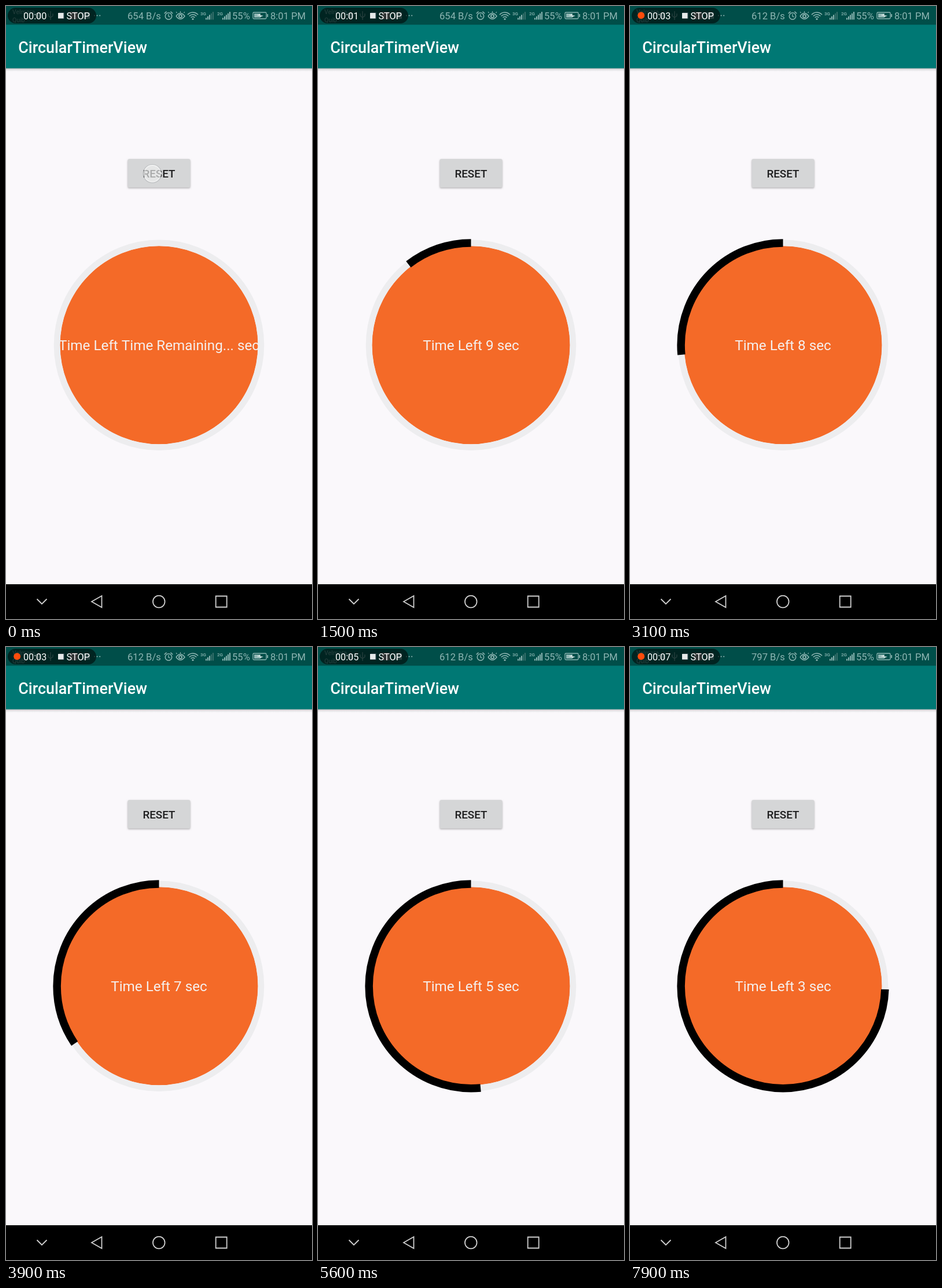
Write an HTML page with a canvas that moves like this. It is 529 by 1058 pixels and loops after 8 s.

```html
<!DOCTYPE html>
<html lang="en">
<head>
<meta charset="utf-8">
<title>CircularTimerView</title>
<style>
html, body { margin: 0; width: 100%; height: 100%; overflow: hidden; background: #faf8fb; }
canvas { display: block; width: 529px; height: 1058px; }
</style>
</head>
<body>
<canvas id="stage"></canvas>
<script>
const W = 529, H = 1058, LOOP = 8000, STEP = 100;
const TAP_END = 450, COUNT = 10000;
const CX = 264.5, CY = 585.3, RING = 176.4;
const ICON = '#8fb6b3';

const canvas = document.getElementById('stage');
const c = canvas.getContext('2d');
const dpr = window.devicePixelRatio || 1;
canvas.width = W * dpr;
canvas.height = H * dpr;
c.scale(dpr, dpr);

function rect(x, y, w, h, color) {
  c.fillStyle = color;
  c.fillRect(x, y, w, h);
}

function round(x, y, w, h, r, color) {
  c.fillStyle = color;
  c.beginPath();
  c.roundRect(x, y, w, h, r);
  c.fill();
}

function disc(x, y, r, color) {
  c.fillStyle = color;
  c.beginPath();
  c.arc(x, y, r, 0, Math.PI * 2);
  c.fill();
}

function arc(x, y, r, from, to, width, color, ccw = false) {
  c.strokeStyle = color;
  c.lineWidth = width;
  c.beginPath();
  c.arc(x, y, r, from, to, ccw);
  c.stroke();
}

const ring = (x, y, r, width, color) => arc(x, y, r, 0, Math.PI * 2, width, color);

function line(points, width, color, closed = false) {
  c.strokeStyle = color;
  c.lineWidth = width;
  c.beginPath();
  points.forEach(([x, y]) => c.lineTo(x, y));
  if (closed) c.closePath();
  c.stroke();
}

function text(str, x, y, size, color, weight = 400, align = 'left') {
  c.font = `${weight} ${size}px Roboto, sans-serif`;
  c.textAlign = align;
  c.fillStyle = color;
  c.fillText(str, x, y);
}

function signal(x, label, lit) {
  text(label, x, 15.5, 8, ICON, 500);
  for (let i = 0; i < 5; i++) {
    const h = 3 + i * 2.6;
    rect(x + 9 + i * 3, 23.5 - h, 2, h, i < lit ? ICON : '#39706c');
  }
}

function alarm(x, y) {
  ring(x, y + 0.5, 5.7, 1.5, ICON);
  line([[x, y - 3], [x, y + 1], [x + 3, y + 2]], 1.3, ICON);
  line([[x - 7.3, y - 4], [x - 3.5, y - 7.3]], 1.6, ICON);
  line([[x + 7.3, y - 4], [x + 3.5, y - 7.3]], 1.6, ICON);
}

function eye(x, y) {
  c.strokeStyle = ICON;
  c.lineWidth = 1.5;
  c.beginPath();
  c.moveTo(x - 7.5, y + 1);
  c.quadraticCurveTo(x, y - 9, x + 7.5, y + 1);
  c.quadraticCurveTo(x, y + 11, x - 7.5, y + 1);
  c.stroke();
  ring(x, y + 1, 2.6, 1.8, ICON);
  line([[x - 6, y - 4.5], [x - 7.3, y - 6.3]], 1.2, ICON);
  line([[x, y - 5], [x, y - 7.5]], 1.2, ICON);
  line([[x + 6, y - 4.5], [x + 7.3, y - 6.3]], 1.2, ICON);
}

function wifi(x, y) {
  for (const r of [4.5, 8.3, 12]) arc(x, y, r, -Math.PI * 0.77, -Math.PI * 0.23, 1.6, ICON);
  disc(x, y - 0.5, 1.6, ICON);
}

function battery(x, y) {
  c.strokeStyle = ICON;
  c.lineWidth = 1.3;
  c.beginPath();
  c.roundRect(x, y, 23, 11, 1.5);
  c.stroke();
  rect(x + 24.3, y + 3, 1.8, 5, ICON);
  rect(x + 2, y + 2, 11, 7, ICON);
  c.fillStyle = '#d3e5e3';
  c.beginPath();
  [[6, 5], [12, 3], [12, 5], [18, 5.8], [12, 8.3], [12, 6.3]].forEach(([dx, dy]) => c.lineTo(x + dx, y + dy));
  c.fill();
}

function recorder(t) {
  const phase = t % 1000;
  const blink = t >= 500 && (phase >= 650 || phase < 150);

  // Notifications dimmed by the recorder pill
  text('Velmora', 11, 13.5, 10.5, ICON);
  text('Quib', 11, 28, 10.5, ICON);
  rect(51, 12, 10, 9, ICON);
  line([[77, 9], [77, 24]], 1.3, ICON);
  line([[73, 13], [73, 17], [77, 20], [81, 17], [81, 13]], 1.3, ICON);
  rect(91, 11, 10, 11, '#7fa4b8');
  rect(111, 10, 13, 13, '#b08c92');
  rect(131, 11, 14, 11, ICON);
  for (let i = 0; i < 3; i++) disc(153 + i * 4.6, 16.5, 1.1, ICON);

  round(3, 3, 153, 27, 13.5, 'rgba(0,20,18,.72)');
  if (blink) disc(19.2, 16.3, 6, '#ff4c0c');
  text('00:0' + Math.floor(t / 1000), 30, 22.5, 16.2, '#fff');
  rect(90, 12, 9.5, 9.5, '#e6e9e9');
  text('STOP', 104.5, 22.5, 16.2, '#fff');
}

function statusBar(t) {
  rect(0, 0, W, 32.3, '#004e49');
  recorder(t);
  const speed = t < 3100 ? 654 : t < 6100 ? 612 : 797;
  text(speed + ' B/s', 210, 22.5, 16.6, ICON);
  alarm(281, 17);
  eye(301.5, 16.5);
  wifi(323, 23);
  signal(336, '3G', 3);
  signal(365, '2G', 5);
  text('55%', 391, 22.5, 16.6, ICON);
  battery(427, 11);
  text('8:01 PM', 518, 22.5, 16.6, ICON, 400, 'right');
}

function appBar() {
  const shade = c.createLinearGradient(0, 107, 0, 113);
  shade.addColorStop(0, 'rgba(0,0,0,.3)');
  shade.addColorStop(0.4, 'rgba(0,0,0,.1)');
  shade.addColorStop(1, 'rgba(0,0,0,0)');
  rect(0, 107, W, 6, shade);
  rect(0, 32, W, 75.5, '#007874');
  text('CircularTimerView', 21.3, 81, 26.9, '#fff', 500);
}

function button(t) {
  c.save();
  c.shadowColor = 'rgba(0,0,0,.3)';
  c.shadowBlur = 3 * dpr;
  c.shadowOffsetY = 1.3 * dpr;
  round(210.6, 264, 107.8, 49.3, 2.7, '#d5d6d7');
  c.restore();
  const press = Math.min(t / 300, 1, Math.max(0, (1000 - t) / 250));
  if (press > 0) round(210.6, 264, 107.8, 49.3, 2.7, `rgba(0,0,0,${0.07 * press})`);
  text('RESET', CX, 296, 18.86, '#1d1d1e', 500, 'center');
  if (t < TAP_END) {
    disc(253, 289.3, 15, 'rgba(236,237,238,.68)');
    ring(253, 289.3, 15.8, 1.2, 'rgba(150,155,158,.4)');
    ring(253, 289.3, 14.3, 1.8, 'rgba(250,250,250,.55)');
  }
}

function timer(t) {
  const spent = t - TAP_END;
  const running = spent >= 0;
  disc(CX, CY, 171.3, '#f46a28');
  ring(CX, CY, RING, 10.8, '#ededef');
  if (running) {
    const top = -Math.PI / 2;
    arc(CX, CY, RING, top, top - spent / COUNT * Math.PI * 2, 13.5, '#000', true);
  }
  const left = running ? Math.ceil((COUNT - spent) / 1000) : 'Time Remaining...';
  c.save();
  c.beginPath();
  c.rect(93.5, 560, 342.5, 50);
  c.clip();
  text(`Time Left ${left} sec`, CX, 594, 24.25, '#f5f0ee', 400, 'center');
  c.restore();
}

function navBar() {
  const color = '#cfcfcf';
  rect(0, 998, W, 60, '#000');
  line([[53.5, 1023.5], [62, 1032], [70.5, 1023.5]], 1.8, color);
  line([[148, 1028], [165.5, 1018], [165.5, 1038]], 1.8, color, true);
  ring(264.3, 1028, 10.3, 1.8, color);
  line([[362.7, 1018.5], [381.7, 1018.5], [381.7, 1037.5], [362.7, 1037.5]], 1.8, color, true);
}

function draw(t) {
  rect(0, 0, W, H, '#faf8fb');
  appBar();
  statusBar(t);
  button(t);
  timer(t);
  navBar();
}

const start = performance.now();
function tick() {
  const t = (performance.now() - start) % LOOP;
  draw(Math.floor(t / STEP) * STEP);
  requestAnimationFrame(tick);
}
tick();
</script>
</body>
</html>
```
